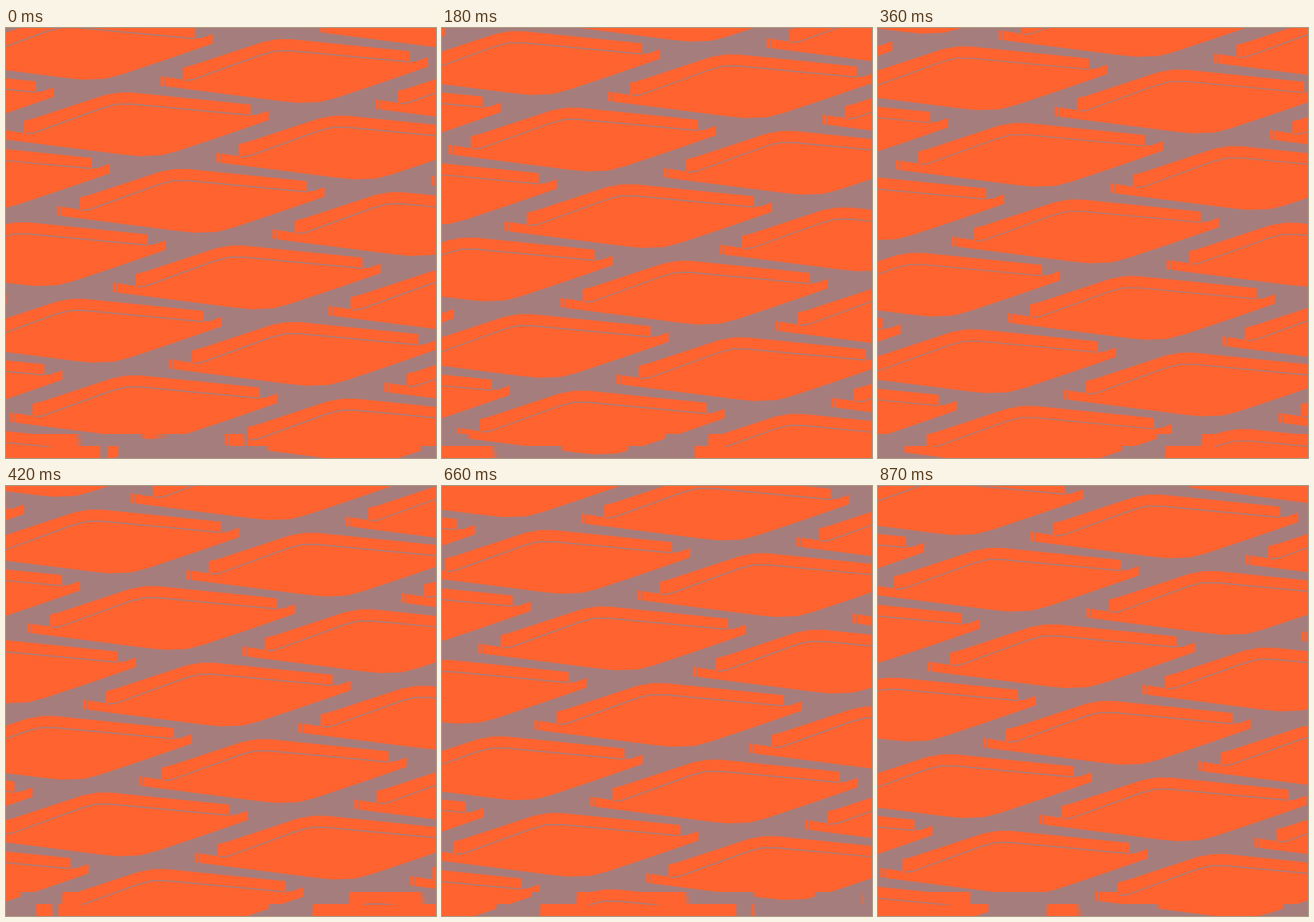
Recreate the animation shown at these times as an HTML page with a canvas. Size 500x500 px, loop 0.9 s.

```html
<!DOCTYPE html>
<html lang="en">
<head>
<meta charset="utf-8">
<title>Drifting tiles</title>
<style>
  html, body { margin: 0; width: 100%; height: 100%; overflow: hidden; background: #a67d7d; }
  canvas { display: block; width: 500px; height: 500px; }
</style>
</head>
<body>
<canvas id="stage" width="500" height="500"></canvas>
<script>
const canvas = document.getElementById('stage');
const ctx = canvas.getContext('2d');
const SIZE = 500, LOOP = 900, STEP = 30;
const ORANGE = '#ff632f', GREY = '#a67d7d';

// Lattice: one step down a column, one step across to the next column.
const DOWN = [65, 89], ACROSS = [250, 27], START = [60, 207];

function toPath(points, closed) {
  const path = new Path2D();
  points.forEach(([x, y], i) => i ? path.lineTo(x, y) : path.moveTo(x, y));
  if (closed) path.closePath();
  return path;
}

// All points are relative to the tile's left tip.
const body = toPath([
  [0, 0], [26, 4], [26, -10], [38, -13], [120, -40], [137, -43], [152, -43],
  [290, -29], [290, -17], [297, -17], [311, -22], [311, -11],
  [256, 8], [205, 25], [186, 30], [160, 31], [140, 29], [0, 11]
], true);
const crease = toPath([[28, 5], [38, 4], [118, -25], [135, -29.5], [152, -29.5], [290, -16.5]]);
const tick = toPath([[4.5, 0], [4.5, 12]]);

function eachTile(phase, draw) {
  for (let i = -3; i <= 3; i++) {
    for (let j = -6; j <= 6; j++) {
      const x = START[0] + i * ACROSS[0] + (j + phase) * DOWN[0];
      const y = START[1] + i * ACROSS[1] + (j + phase) * DOWN[1];
      if (x < -320 || x > SIZE || y < -40 || y > SIZE + 50) continue;
      ctx.save();
      ctx.translate(x, y);
      draw();
      ctx.restore();
    }
  }
}

function clipTo(top, height) {
  ctx.beginPath();
  ctx.rect(0, top, SIZE, height);
  ctx.clip();
}

// Squares off the shapes in a band so they follow a single row of it.
function squareBand(top, bottom, row) {
  ctx.save();
  clipTo(top, bottom - top);
  ctx.globalCompositeOperation = 'destination-in';
  ctx.drawImage(canvas, 0, row, SIZE, 1, 0, top, SIZE, bottom - top);
  ctx.globalCompositeOperation = 'source-over';
  ctx.drawImage(canvas, 0, row, SIZE, 1, 0, top, SIZE, row - top);
  ctx.restore();
}

function render(phase) {
  ctx.clearRect(0, 0, SIZE, SIZE);
  ctx.imageSmoothingEnabled = false;
  ctx.fillStyle = ORANGE;
  eachTile(phase, () => ctx.fill(body));
  squareBand(472, 486, 477);
  squareBand(486, 500, 491);

  ctx.save();
  clipTo(0, 487);
  ctx.strokeStyle = GREY;
  ctx.lineWidth = 1.4;
  eachTile(phase, () => {
    ctx.stroke(crease);
    ctx.stroke(tick);
  });
  ctx.restore();
}

function loop() {
  const t = performance.now() % LOOP;
  render(Math.floor(t / STEP) * STEP / LOOP);
  requestAnimationFrame(loop);
}
loop();
</script>
</body>
</html>
```
